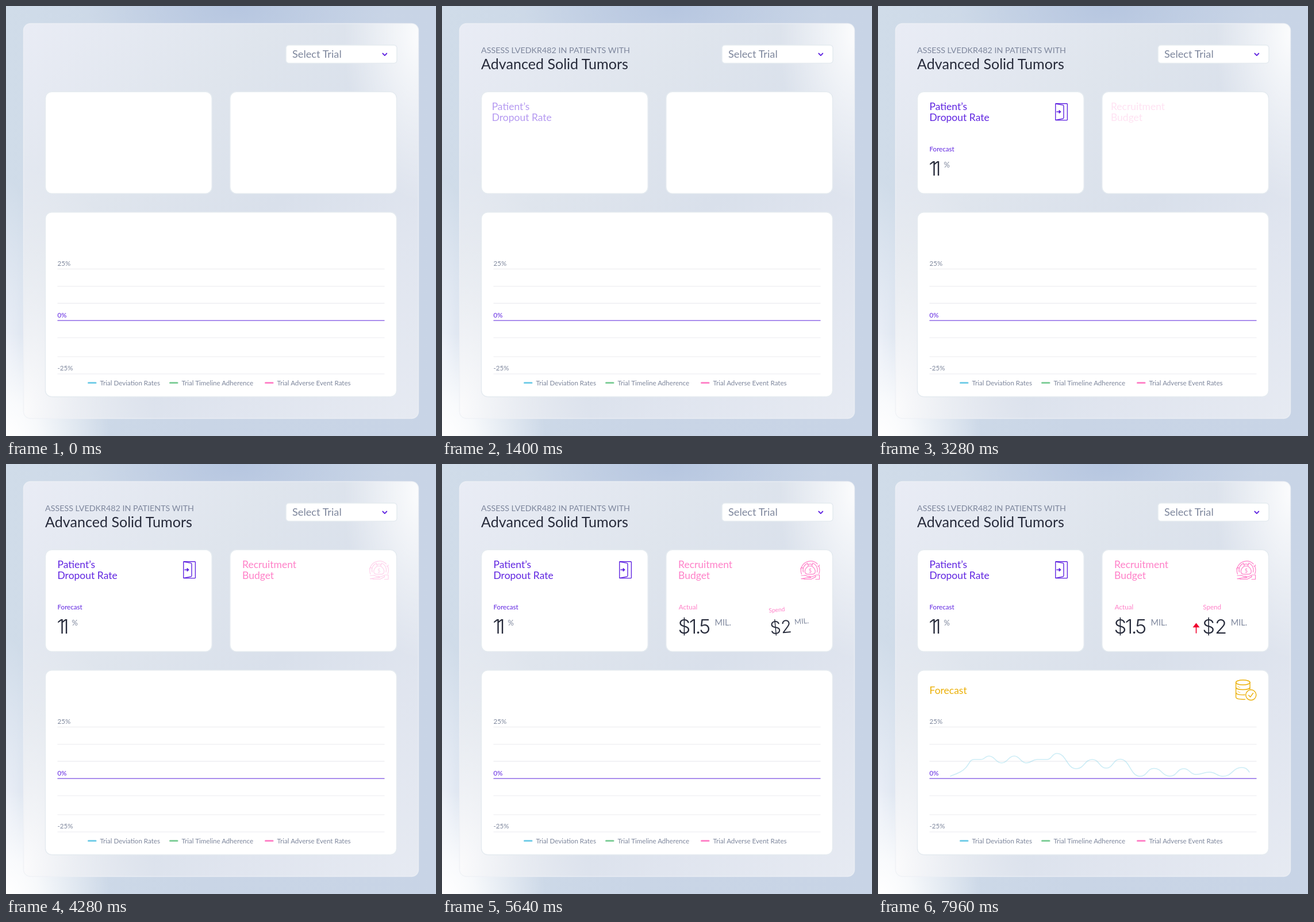
Animation of 748 by 748 pixels, one loop 8 s. Source, as an HTML page:

```html
<!DOCTYPE html>
<html lang="en">
<head>
<meta charset="utf-8">
<title>Trial dashboard</title>
<style>
  html, body { margin: 0; width: 100%; height: 100%; overflow: hidden; }
  body {
    background:
      radial-gradient(circle at 0 748px, #fff 0, #fffc 60px, #fff0 180px),
      radial-gradient(ellipse 70px 300px at 0 600px, #f2f4fbcc, #f2f4fb00),
      radial-gradient(ellipse 260px 130px at 400px 0, #b6c6e0, #b6c6e000),
      linear-gradient(90deg, #d0dce9, #c9d5e6 45%, #c8d4e6);
  }
  svg { display: block; width: 100vw; height: 100vh; font-family: Lato, sans-serif; }
  .card { fill: #fff; stroke: #e5ebf0; stroke-width: 1.5; }
  .grey { fill: #7d869c; }
  .dark { fill: #262a3a; }
  .violet { fill: #6025e1; }
  .pink { fill: #ff80c8; }
  .gold { fill: #ebb008; }
  .h { font-size: 17.5px; }
  .s { font-size: 11.6px; }
  .unit { font-size: 14.5px; }
  .num { font: 300 34.5px Inter, sans-serif; }
  .icon { fill: none; stroke-width: 1.4; stroke-linecap: round; stroke-linejoin: round; }
</style>
</head>
<body>
<svg viewBox="0 0 748 748">
  <defs>
    <linearGradient id="base" x1="0" y1="0" x2="1" y2="1">
      <stop offset="0" stop-color="#e9ecf5"/>
      <stop offset=".32" stop-color="#dfe5ed"/>
      <stop offset=".55" stop-color="#d9e0eb"/>
      <stop offset=".75" stop-color="#e0e5ef"/>
      <stop offset="1" stop-color="#e6eaf2"/>
    </linearGradient>
    <radialGradient id="glowTop" gradientUnits="userSpaceOnUse" cx="0" cy="0" r="1"
      gradientTransform="translate(718 50) scale(130 290)">
      <stop offset="0" stop-color="#fff" stop-opacity=".9"/>
      <stop offset=".4" stop-color="#fff" stop-opacity=".55"/>
      <stop offset="1" stop-color="#fff" stop-opacity="0"/>
    </radialGradient>
    <radialGradient id="glowLow" gradientUnits="userSpaceOnUse" cx="0" cy="0" r="1"
      gradientTransform="translate(30 700) scale(230 420)">
      <stop offset="0" stop-color="#fbfbfc"/>
      <stop offset="1" stop-color="#f0f1f4" stop-opacity="0"/>
    </radialGradient>
  </defs>

  <g id="panel">
    <rect x="30.5" y="30.5" width="687" height="687" rx="12" fill="url(#base)"/>
    <rect x="30.5" y="30.5" width="687" height="687" rx="12" fill="url(#glowLow)"/>
    <rect x="30.5" y="30.5" width="687" height="687" rx="12" fill="url(#glowTop)" stroke="#eff2f6" stroke-opacity=".75" stroke-width="1.5"/>
  </g>

  <rect class="card" x="487" y="68" width="193" height="31.5" rx="5"/>
  <text class="grey" x="498" y="90.3" font-size="18.2">Select Trial</text>
  <path class="icon" d="M655.3 82.5l3.5 3.6 3.5-3.6" stroke="#6025e1" style="stroke-width:1.8"/>

  <rect class="card" x="68.5" y="149.3" width="289.7" height="177" rx="11"/>
  <rect class="card" x="389.8" y="149.3" width="289.7" height="177" rx="11"/>
  <rect class="card" x="68.5" y="358.7" width="611" height="321" rx="11"/>

  <g id="grid"></g>
  <g class="s">
    <text class="grey" x="89.5" y="451.5">25%</text>
    <text class="violet" x="89.5" y="541.5">0%</text>
    <text class="grey" x="89.5" y="634">-25%</text>
  </g>
  <g id="legend" class="s grey"></g>

  <g id="title">
    <text class="grey" x="68" y="81.7" font-size="14.3">ASSESS LVEDKR482 IN PATIENTS WITH</text>
    <text class="dark" x="68" y="110" font-size="25.1">Advanced Solid Tumors</text>
  </g>

  <g id="dropout" class="h violet">
    <text x="89.5" y="181.3">Patient’s</text>
    <text x="89.5" y="199.5">Dropout Rate</text>
  </g>
  <g id="door" class="icon" stroke="#6025e1">
    <rect x="308.8" y="169.8" width="20.6" height="28.8" rx="1.2"/>
    <path d="M309 170l12.6 2.4q1.4.3 1.4 1.7v20.2q0 1.4-1.4 1.7l-12.6 2.4M311 184h6"/>
    <path d="M315.2 181.7l2.6 2.3-2.6 2.3z" fill="#6025e1"/>
  </g>
  <g id="rate">
    <text class="s violet" x="89.5" y="252.5">Forecast</text>
    <text class="num dark" x="88.5" y="295.3" letter-spacing="-6">11</text>
    <text class="unit grey" x="114.5" y="280.5" style="font-size:13px">%</text>
  </g>

  <g id="recruit" class="h pink">
    <text x="411" y="181.3">Recruitment</text>
    <text x="411" y="199.5">Budget</text>
  </g>
  <g id="money" class="icon" stroke="#ff80c8" style="stroke-width:1.2">
    <path d="M625.5 191.5A16.6 16.6 0 0 1 653 174M655.5 178A16.6 16.6 0 0 1 655.6 191"/>
    <path d="M628.5 188A12.8 12.8 0 0 1 636 172.5M644.5 172.3A12.8 12.8 0 0 1 652.5 188"/>
    <path d="M623.8 182.5l1.6-3 2.6 2M653.5 177.5l2.2.6.8-2.6"/>
    <path d="M637.5 177.5q-6 4-6.2 9 0 4.6 4 5.2h10q4-.6 4-5.2-.2-5-6.2-9zM637.5 177.5l-1.6-3.6 2.4.8 2-1 2 1 2.4-.8-1.6 3.6"/>
    <path d="M625 194h4q3-1.4 6.5 1.4h4.500q2 .6 1.2 2.4h-6M641.5 196.8l7-2.6q2.4.2 1.5 2.2l-8 4.1h-11l-2-.9h-4zM650 193h6.5v7.5H650"/>
    <text x="640.4" y="188.6" font-size="9.5" text-anchor="middle" fill="#ff80c8" stroke="none">$</text>
  </g>
  <g id="actual">
    <text class="s pink" x="411.8" y="252.5">Actual</text>
    <text class="num dark" x="410.5" y="295.3" letter-spacing="-2.6">$1.5</text>
    <text class="unit grey" x="474.5" y="280.5">MIL.</text>
  </g>
  <g id="spend">
    <text class="s pink" x="565.3" y="252.5">Spend</text>
    <text class="num dark" x="564.3" y="295.3">$2</text>
    <text class="unit grey" x="613.8" y="280.5">MIL.</text>
  </g>
  <path id="rise" d="M553.5 276.5l6 7.7h-5.2v10.3h-1.6v-10.3h-5.2z" fill="#f0002d"/>

  <text id="forecast" class="h gold" x="89.5" y="400">Forecast</text>
  <g id="data" class="icon" stroke="#ebb008">
    <ellipse cx="634.8" cy="380" rx="12.2" ry="4.2"/>
    <path d="M622.6 380v25.5c0 2.8 6 4.4 16 3.9M647 380v11.5M622.6 388.5c1 5.400 23.4 5.400 24.4 0M622.6 397.3c.8 3.6 8 4.7 15.5 4.2M626.5 387.5h.1M629 388.4h.1M626.5 396.3h.1M629 397.2h.1"/>
    <circle cx="648.8" cy="401.8" r="9" fill="#fff"/>
    <path d="M644.8 402.3l2.8 3 5-6.8"/>
  </g>
  <path id="line" fill="none" stroke="#7bd0e6" stroke-width="1.6" stroke-linecap="round"/>
</svg>
<script>
const LOOP = 8000;
const $ = id => document.getElementById(id);

$('grid').innerHTML = [457.5, 487.5, 517.2, 547.2, 577, 610, 640].map((y, i) =>
  `<path d="M89.5 ${y}H658.5" stroke="${i === 3 ? '#7a4de2' : '#ebebef'}" stroke-width="1.2"/>`).join('');

$('legend').innerHTML = [
  [143.5, '#76cee8', 'Trial Deviation Rates'],
  [285.5, '#82cf9b', 'Trial Timeline Adherence'],
  [451.5, '#ff86c9', 'Trial Adverse Event Rates']
].map(([x, color, name]) =>
  `<path d="M${x} 655.5h12.5" stroke="${color}" stroke-width="3" stroke-linecap="round"/>` +
  `<text x="${x + 20}" y="659.5">${name}</text>`).join('');

// Peaks and dips joined by curves that are level at every point.
const waves = [[167, 514], [179, 514], [193, 508], [215, 520], [237, 508], [258, 520], [277, 514],
  [294, 514], [311, 503.5], [345, 530], [373, 514], [397, 529], [421, 513.5], [456, 543.3],
  [480, 529.5], [508, 543], [532, 530], [553, 540], [577, 536], [600, 543.3], [633, 528]];
let d = 'M126 543C136 539 146 536 153 528S160 514 167 514';
waves.slice(1).forEach(([x, y], i) => {
  const [px, py] = waves[i], mid = (px + x) / 2;
  d += `C${mid} ${py} ${mid} ${y} ${x} ${y}`;
});
$('line').setAttribute('d', d + 'C639 528 642 530 646 536');

const slide = (dx, dy = 0, end = 0) => (p, u) => [`translate(${end + dx * (1 - p)} ${dy * (1 - p)})`, u];
const about = (x, y, f) => `translate(${x} ${y}) ${f} translate(${-x} ${-y})`;
const spin = (x, y) => (p, u) => [about(x, y, `rotate(${-45 * (1 - p)}) scale(${p})`), u * 2];
const zoom = (x, y) => (p, u) => [about(x, y, `scale(${0.85 + 0.15 * p})`), u * 1.6];

// id, start, duration, move
const steps = [
  ['title', 180, 820, zoom(196.5, 91)],
  ['dropout', 1010, 840, slide(-10)],
  ['door', 1885, 800, slide(20)],
  ['rate', 1970, 900, spin(133, 273)],
  ['recruit', 3080, 900, slide(-10)],
  ['money', 4000, 800, slide(20)],
  ['actual', 4300, 900, spin(457, 274)],
  ['spend', 5050, 900, spin(608, 274)],
  ['rise', 6100, 500, slide(0, 10)],
  ['forecast', 6100, 800, slide(-10)],
  ['data', 6630, 800, slide(20)],
  ['line', 7660, 800, slide(-20, 0, 7.8)]
].map(([id, ...rest]) => [$(id), ...rest]);

function draw(t) {
  for (const [el, start, length, move] of steps) {
    const u = Math.min(1, Math.max(0, (t - start) / length));
    const [transform, alpha] = move(1 - (1 - u) ** 2, u);
    el.setAttribute('transform', transform);
    el.setAttribute('opacity', Math.min(1, alpha));
  }
}

let begin;
function tick(now) {
  begin ??= now;
  draw((now - begin) % LOOP);
  requestAnimationFrame(tick);
}
draw(0);
requestAnimationFrame(tick);
</script>
</body>
</html>
```
